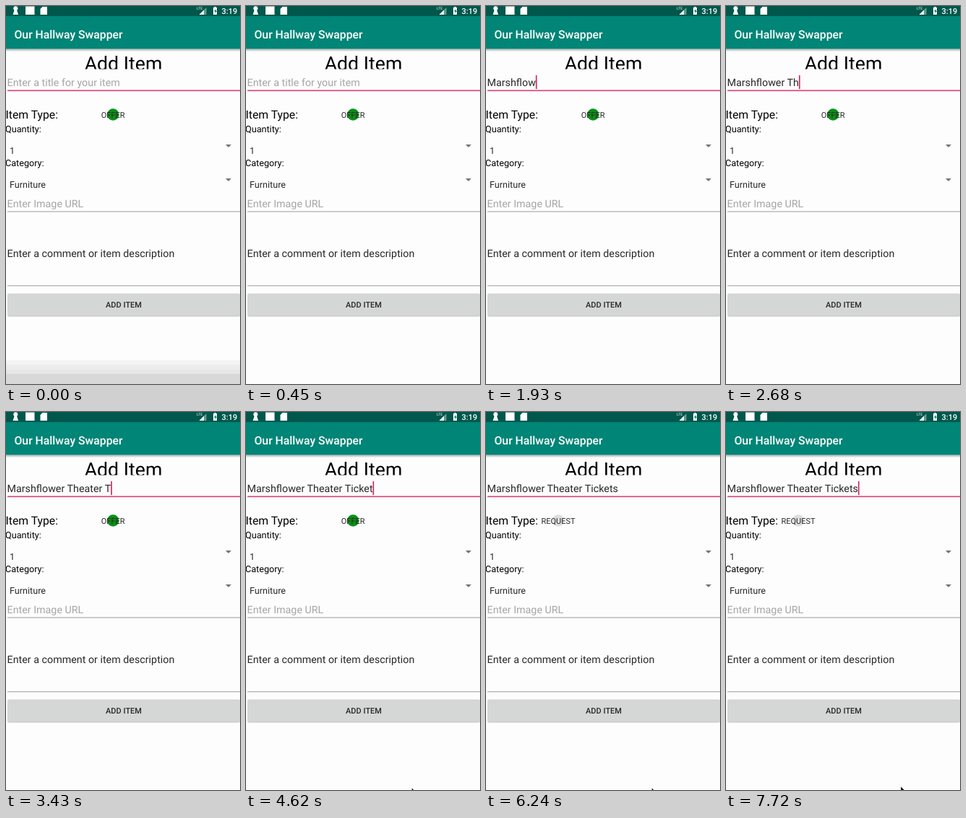
An HTML page for the animation above (8000 ms loop, 324x524 px).

```html
<!DOCTYPE html>
<html lang="en">
<head>
<meta charset="utf-8">
<title>Add Item</title>
<style>
  html, body { margin: 0; width: 100%; height: 100%; overflow: hidden; background: #fdfdfd; }
  svg { display: block; width: 324px; height: 524px; }
  text { font-family: Roboto, "Liberation Sans", sans-serif; fill: #282828; white-space: pre; text-rendering: geometricPrecision; }
  .large { font-size: 15.76px; }
  .input { font-size: 14.3px; }
  .label { font-size: 12.61px; }
  .small { font-size: 11.03px; }
  .medium { font-weight: 500; }
  .white { fill: #fff; }
  .hint { fill: #a6a6a6; }
  .black { fill: #000; }
  .mid { text-anchor: middle; }
</style>
</head>
<body>
<svg viewBox="0 0 324 524">
  <defs>
    <linearGradient id="shade" x2="0" y2="1">
      <stop stop-color="#000" stop-opacity=".3"/>
      <stop offset="1" stop-color="#000" stop-opacity="0"/>
    </linearGradient>
    <clipPath id="headingClip"><path d="M0 60H324V87.5H0z"/></clipPath>
  </defs>
  <rect width="324" height="524" fill="#fdfdfd"/>

  <!-- app bar and status bar -->
  <rect y="59.500" width="324" height="4" fill="url(#shade)"/>
  <rect width="324" height="59.500" fill="#008577"/>
  <rect width="324" height="14" fill="#00574b"/>
  <g fill="#fff">
    <circle cx="13.300" cy="3.200" r="3"/>
    <path d="M12 4h2.600l2.400 8H9.600z"/>
    <rect x="27" y="0.500" width="12.500" height="11.500"/>
    <path d="M50.500 1H57V12H47.500V4z"/>
    <path d="M277.500 2V12H267.500z" opacity=".4"/>
    <path d="M274 5.500V12H267.500z"/>
    <path d="M287 2H288.500V1H290.500V2H292V12H287z"/>
  </g>
  <path d="M290.300 4l-2 3.500h1.500v2.500l2-3.500h-1.500z" fill="#00574b"/>
  <text class="white medium" x="264" y="5" font-size="5" opacity=".8">LTE</text>
  <text class="white small medium" x="298.500" y="11">3:19</text>
  <text class="white large medium" x="11.500" y="45">Our Hallway Swapper</text>

  <!-- form -->
  <g clip-path="url(#headingClip)">
    <text class="black mid" x="162.500" y="88.500" font-size="26.700">Add Item</text>
  </g>
  <text id="title" class="input" x="1.500" y="110.500"></text>
  <rect id="caret" y="96" width="1.600" height="19" fill="#d81b60"/>
  <rect x="2" y="116.400" width="322" height="1.700" fill="#dc4a7c"/>

  <text class="large black" x="-0.500" y="156">Item Type:</text>
  <circle id="thumb" cy="150.500" r="8.200"/>
  <text id="choice" class="small mid" y="154.500"></text>

  <text class="label black" x="-1" y="174.500">Quantity:</text>
  <text class="label" x="5" y="204.500">1</text>
  <text class="label black" x="-1" y="221.500">Category:</text>
  <text class="label" x="5" y="252">Furniture</text>
  <path d="M304 192h8l-4 4zM304 239h8l-4 4z" fill="#757575"/>

  <text class="input hint" x="1.500" y="279">Enter Image URL</text>
  <text class="input" x="1.500" y="348">Enter a comment or item description</text>
  <path d="M2 285H324M2 387.800H324" stroke="#9a9a9a"/>

  <rect x="2" y="399.500" width="322" height="31" rx="2" fill="#c6c6c6"/>
  <rect x="2" y="398.500" width="322" height="31" rx="2" fill="#d5d6d6"/>
  <text class="small medium mid" x="163" y="417.500">ADD ITEM</text>

  <g id="keyboard">
    <rect y="491" width="324" height="34" fill="#f4f4f4"/>
    <rect y="497" width="324" height="28" fill="#ededed"/>
    <rect y="504" width="324" height="20" fill="#e7e7e7"/>
    <rect y="510" width="324" height="20" fill="#d8d8d8"/>
  </g>
  <path id="pointer" d="M0 0V11L2.600 8.600L4.400 12.500L6 11.800L4.300 8H7.800z" stroke="#fff" stroke-width=".5"/>
</svg>
<script>
const LOOP = 8000;
const HINT = "Enter a title for your item";
const ITEM = "Marshflower Theater Tickets";
const KEY_TIMES = [
  600, 740, 890, 1040,
  1340, 1490, 1640, 1780, 1930, 2080, 2230, 2380,
  2530, 2680, 2830, 2980, 2980, 3130, 3280, 3430, 3430,
  4020, 4170, 4320, 4470, 4620, 5070
];
const el = id => document.getElementById(id);
const show = (node, on) => node.setAttribute("visibility", on ? "visible" : "hidden");
const move = (node, x, y) => node.setAttribute("transform", `translate(${x} ${y})`);
const between = (t, from, to) => t >= from && t < to;

const title = el("title"), caret = el("caret"), thumb = el("thumb"),
      choice = el("choice"), keyboard = el("keyboard"), pointer = el("pointer");

function drawTitle(t) {
  const typed = KEY_TIMES.filter(k => k <= t).length;
  title.textContent = typed ? ITEM.slice(0, typed) : HINT;
  title.classList.toggle("hint", !typed);
  caret.setAttribute("x", 1.5 + title.getComputedTextLength());
  show(caret, typed && !between(t, 5510, 5950) && !between(t, 6240, 7130));
}

function drawSwitch(t) {
  const x = t < 5950 ? 148.2 : t < 6100 ? 136 : t < 6240 ? 109 : 100;
  const offer = x > 124;
  thumb.setAttribute("cx", x);
  thumb.setAttribute("fill", offer ? "#0b8f16" : "#dedede");
  choice.setAttribute("x", x);
  choice.textContent = offer ? "OFFER" : "REQUEST";
}

function drawPointer(t) {
  const step = Math.max(0, Math.min(5, Math.floor((t - 7130) / 147) + 1));
  show(pointer, t >= 4470);
  move(pointer, 229.5 + step * 2.5, t < 4620 ? 522.5 : 521 - step * 0.4);
}

function draw() {
  const t = performance.now() % LOOP;
  drawTitle(t);
  drawSwitch(t);
  drawPointer(t);
  show(keyboard, t < 300);
  move(keyboard, 0, t < 150 ? 0 : 20);
  requestAnimationFrame(draw);
}
draw();
</script>
</body>
</html>
```
